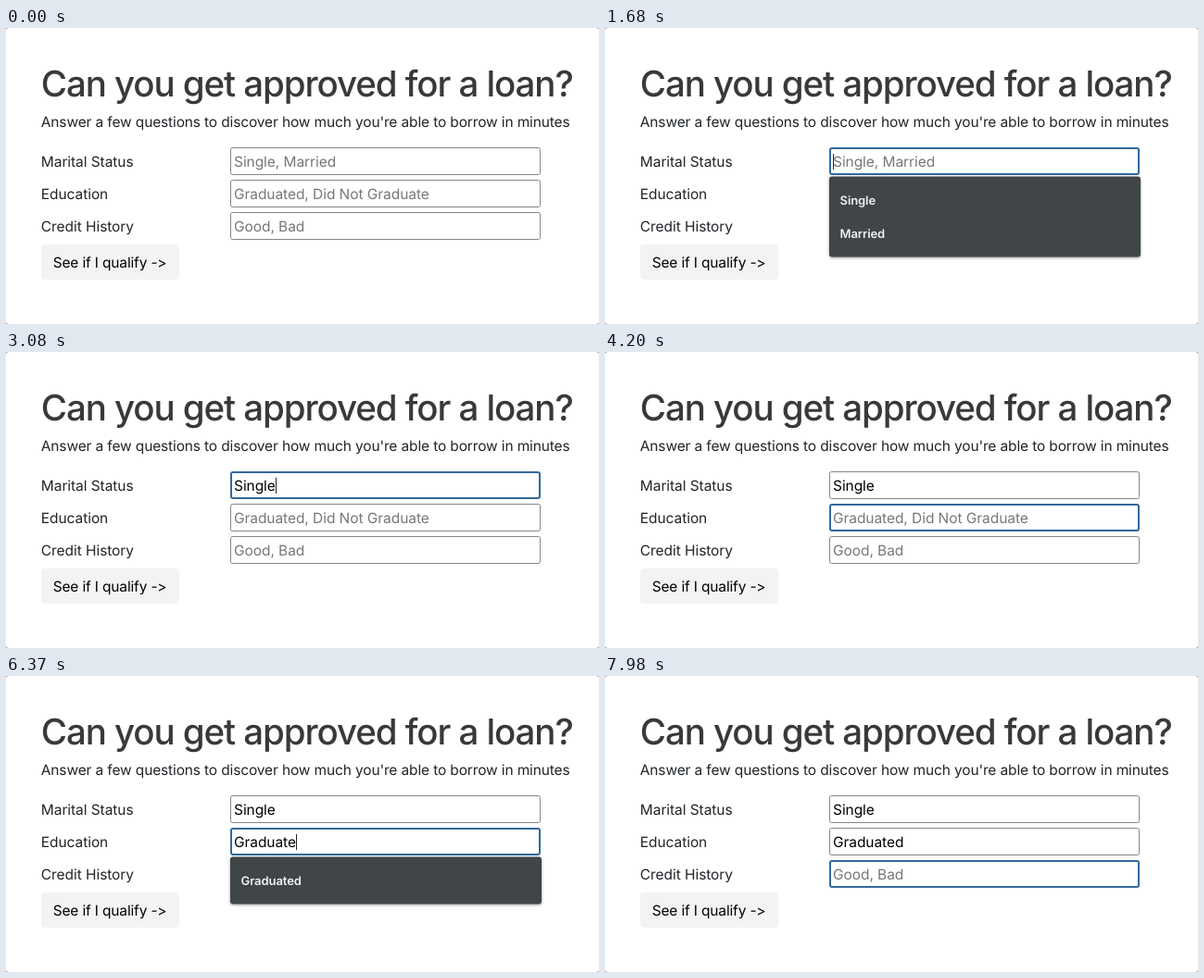
Recreate the animation shown at these times as an HTML page. Size 640 by 320 pixels, loop 8 s.

```html
<!DOCTYPE html>
<html lang="en">
<head>
<meta charset="utf-8">
<title>Loan form</title>
<style>
  html, body { margin: 0; width: 100%; height: 100%; overflow: hidden; background: #fff; }
  svg { display: block; width: 640px; height: 320px; }
  text {
    font: 400 15.5px Inter, "Open Sans", sans-serif;
    letter-spacing: -.06px;
    font-optical-sizing: none;
    font-variant-ligatures: none;
    text-rendering: geometricPrecision;
    fill: #212529;
    white-space: pre;
  }
  .title { font-size: 38.5px; font-weight: 500; letter-spacing: -1.08px; fill: #39393b; }
  .lead { letter-spacing: -.14px; }
  .action { letter-spacing: -.16px; fill: #000; }
  .button { fill: #f3f3f3; }
  .value { fill: #000; }
  .hint { fill: #777; }
  .box { fill: #fff; stroke: #858585; stroke-width: 1; }
  .box.focus { stroke: #32699b; stroke-width: 2; }
  .caret { fill: #222; }
  .menu rect { fill: #404547; filter: drop-shadow(0 1px 1.5px rgba(0, 0, 0, .4)); }
  .menu text { font-size: 13px; font-weight: 600; letter-spacing: -.08px; fill: #f1f1f1; }
</style>
</head>
<body>
<svg id="stage" viewBox="0 0 640 320"></svg>
<script>
const LOOP = 8000;
const ROW_TOP = 129, ROW_STEP = 35, TEXT_X = 246, OPTION_H = 36;
const BOX_X = 242, BOX_W = 335, BOX_H = 30;

const fields = [
  { label: "Marital Status", hint: "Single, Married" },
  { label: "Education", hint: "Graduated, Did Not Graduate" },
  { label: "Credit History", hint: "Good, Bad" }
];

// time, focused field, typed text, caret shown, suggestions
const steps = [
  [0, -1, "", 0, []],
  [1540, 0, "", 1, []],
  [1610, 0, "", 1, ["Single", "Married"]],
  [2100, 0, "", 0, ["Single", "Married"]],
  [2380, 0, "S", 1, ["Single"]],
  [2660, 0, "Si", 1, ["Single"]],
  [2730, 0, "Sin", 1, ["Single"]],
  [2800, 0, "Sing", 1, ["Single"]],
  [3010, 0, "Singl", 1, ["Single"]],
  [3080, 0, "Single", 1, []],
  [3570, 0, "Single", 0, []],
  [3710, 1, "", 1, []],
  [4200, 1, "", 0, []],
  [4620, 1, "G", 1, ["Graduated"]],
  [4900, 1, "Gr", 1, ["Graduated"]],
  [4970, 1, "Gra", 1, ["Graduated"]],
  [5460, 1, "Grad", 1, ["Graduated"]],
  [5810, 1, "Gradu", 1, ["Graduated"]],
  [6090, 1, "Gradua", 1, ["Graduated"]],
  [6230, 1, "Graduat", 1, ["Graduated"]],
  [6370, 1, "Graduate", 1, ["Graduated"]],
  [6580, 1, "Graduated", 1, []],
  [7070, 2, "", 1, []],
  [7630, 2, "", 0, []]
];
const finished = ["Single", "Graduated", ""];

const stage = document.getElementById("stage");

function set(node, attrs) {
  for (const key in attrs) node.setAttribute(key, attrs[key]);
  return node;
}
function add(parent, tag, attrs = {}, content = "") {
  const node = document.createElementNS("http://www.w3.org/2000/svg", tag);
  node.textContent = content;
  return parent.appendChild(set(node, attrs));
}
const write = (x, y, content, cls = "", parent = stage) =>
  add(parent, "text", { x, y, class: cls }, content);
const rowTop = i => ROW_TOP + i * ROW_STEP;

add(stage, "rect", { width: 640, height: 320, fill: "#999" });
add(stage, "rect", { width: 640, height: 320, rx: 3, fill: "#fff" });
write(37.8, 74, "Can you get approved for a loan?", "title");
write(37.8, 107, "Answer a few questions to discover how much you're able to borrow in minutes", "lead");

fields.forEach((field, i) => {
  const baseline = rowTop(i) + 21;
  write(37.8, baseline, field.label);
  field.box = add(stage, "rect", { rx: 2 });
  field.text = write(TEXT_X, baseline, "");
});

add(stage, "rect", { x: 38, y: 234, width: 149, height: 38, rx: 4, class: "button" });
write(50.7, 259, "See if I qualify ->", "action");

const caret = add(stage, "rect", { width: 1, height: 17, class: "caret" });
const menu = add(stage, "g", { class: "menu" });

// The border lies inside the box, so its centre line is inset by half its weight.
function drawBox(box, top, focused) {
  const inset = focused ? 1 : .5;
  set(box, {
    x: BOX_X + inset, y: top + inset,
    width: BOX_W - 2 * inset, height: BOX_H - 2 * inset,
    class: focused ? "box focus" : "box"
  });
}

function show([, focus, typed, caretOn, options]) {
  fields.forEach((field, i) => {
    const value = i < focus ? finished[i] : i === focus ? typed : "";
    drawBox(field.box, rowTop(i), i === focus);
    set(field.text, { class: value ? "value" : "hint" });
    field.text.textContent = value || field.hint;
  });

  const top = rowTop(Math.max(focus, 0));
  const width = typed ? fields[focus].text.getComputedTextLength() : 0;
  set(caret, {
    x: Math.round(TEXT_X + width),
    y: top + 7,
    visibility: caretOn ? "visible" : "hidden"
  });

  menu.replaceChildren();
  if (!options.length) return;
  const y = top + 31.5;
  add(menu, "rect", { x: 242, y, width: 336, height: 15 + options.length * OPTION_H, rx: 3 });
  options.forEach((name, i) => write(253.5, y + 30.5 + i * OPTION_H, name, "", menu));
}

let current;
function tick() {
  const t = performance.now() % LOOP;
  const step = steps.findLast(s => s[0] <= t);
  if (step !== current) show(current = step);
  requestAnimationFrame(tick);
}
tick();
</script>
</body>
</html>
```
